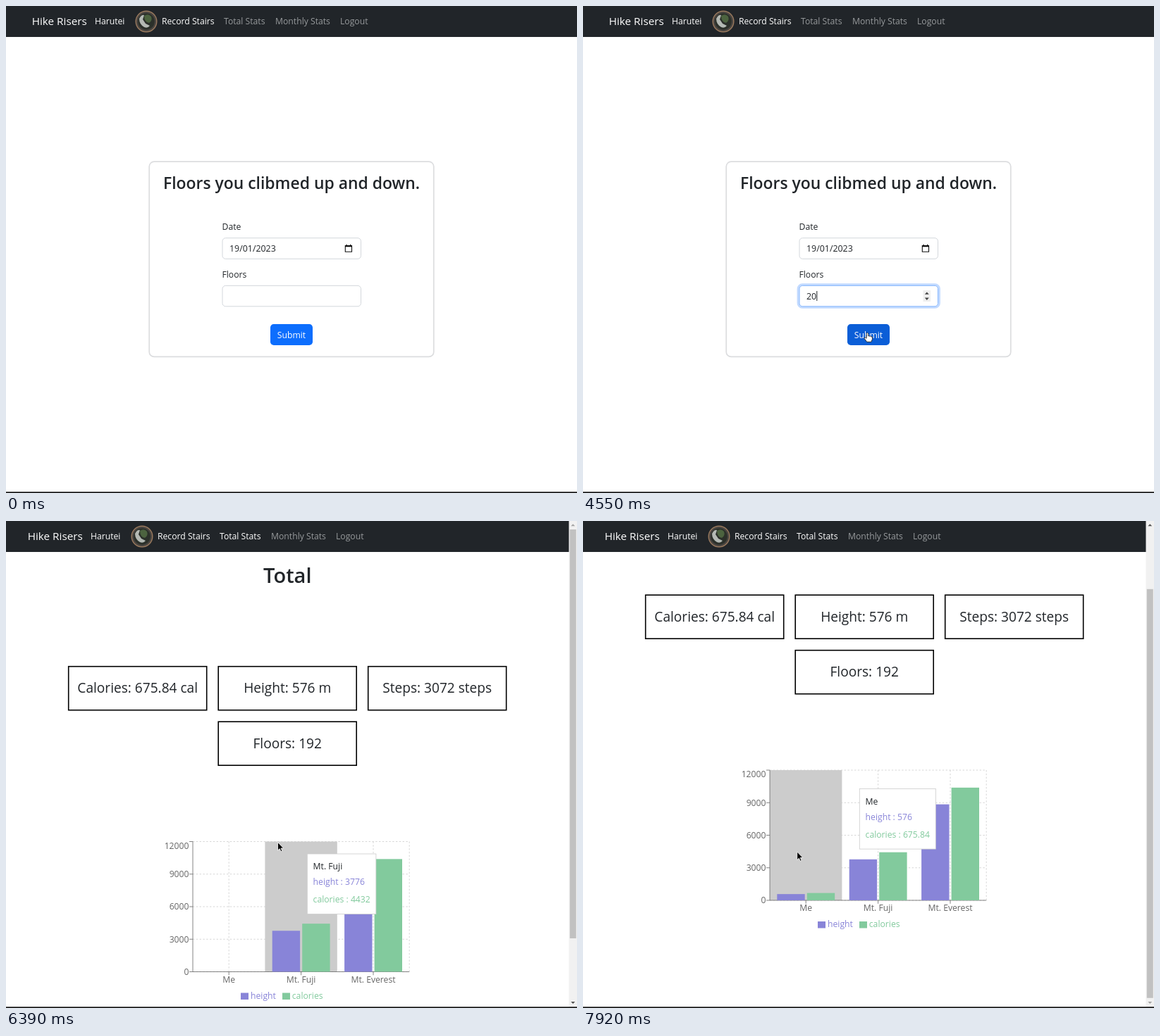
Write an HTML page that moves like this. It is 810 px wide and 692 px high and loops after 7.99 s.

```html
<!DOCTYPE html>
<html lang="en">
<head>
<meta charset="utf-8">
<title>Stair log</title>
<style>
  html, body { margin: 0; width: 100%; height: 100%; overflow: hidden; background: #fff; }
  svg { display: block; width: 810px; height: 692px; }
  text { font: 500 12.2px "Open Sans", "Noto Sans", sans-serif; fill: #212529; white-space: pre; }
  .mid { text-anchor: middle; }
  .end { text-anchor: end; }
  .brand { font-size: 15.3px; font-weight: 400; }
  .title { font-size: 22.9px; font-weight: 600; }
  .head { font-size: 29px; font-weight: 600; }
  .stat { font-size: 19.1px; font-weight: 400; }
  .value { font-size: 12.4px; }
  .on { fill: #fff; }
  .off { fill: #979a9c; }
  .axis { fill: #666; }
  .h { fill: #8884d8; }
  .c { fill: #82ca9d; }
  .field { fill: #fff; stroke: #d3d7dc; stroke-width: 1; }
  .box { fill: #fff; stroke: #000; stroke-width: 1.6; }
</style>
</head>
<body>
<svg id="stage" viewBox="0 0 810 692"></svg>
<script>
const LOOP = 7990, PAGE = 5940, LOADED = 6310;
const BASE = 640.5, TALL = 185, LEFT = 265, BAND = 102.4;
const peaks = [["Me", 576, 675.84], ["Mt. Fuji", 3776, 4432], ["Mt. Everest", 8848, 10388]];

const text = (x, y, s, cls = "", id = "") => `<text x="${x}" y="${y}" class="${cls}" id="${id}">${s}</text>`;
const rect = (x, y, w, h, rest = "") => `<rect x="${x}" y="${y}" width="${w}" height="${h}" ${rest}/>`;
const path = (d, rest = "") => `<path d="${d}" ${rest}/>`;
const group = (id, body) => `<g id="${id}">${body}</g>`;

function form() {
  return rect(203.2, 221.2, 403.6, 277.2, 'rx="7" fill="#fff" stroke="#dcdddf" stroke-width="1.7"')
    + text(405, 260, "Floors you clibmed up and down.", "mid title")
    + text(306.5, 318, "Date")
    + rect(307, 329.7, 196.5, 29.6, 'rx="4.5" class="field"')
    + text(317, 349, "19/01/2023", "value")
    + path("M481.3 340.5h9.2v8.7h-9.2z", 'fill="none" stroke="#111" stroke-width="1.1"')
    + path("M481 340h9.8v2.2h-9.8zM482.6 338.8h1.2v1.5h-1.2zM488 338.800h1.200v1.500h-1.200z", 'fill="#111"')
    + text(306.5, 386, "Floors")
    + rect(305.2, 395.8, 200.1, 32.4, 'rx="6" id="ring" fill="none" stroke="#0d6efd" stroke-opacity=".25" stroke-width="3.2"')
    + rect(307, 397.4, 196.5, 29.4, 'rx="4.5" class="field" id="floors"')
    + text(317, 416.5, "", "value", "typed")
    + rect(0, 405, 1, 14, 'id="caret" fill="#212529"')
    + group("spin", rect(482.5, 404, 10.5, 16, 'fill="#efefef"')
      + path("M484.8 409.8l3-3.4 3 3.4zM484.8 414.6l3 3.4 3-3.4z", 'fill="#444"'))
    + rect(375, 452, 60, 30, 'rx="4.8" id="button"')
    + text(405, 471.5, "Submit", "mid on");
}

function stat(x, y, id) {
  return rect(x, y, 196, 62, 'class="box"') + text(x + 98, y + 37.5, "", "mid stat", id);
}

function chart() {
  let out = "", axis = "", grid = "";
  for (let i = 0; i < 5; i++) {
    const y = BASE - i * TALL / 4;
    grid += `M${LEFT} ${y}h${3 * BAND}`;
    axis += `M${LEFT - 5} ${y}h5`;
    out += text(259.5, i == 4 ? y + 10 : y + 4.4, i * 3000, "end axis");
  }
  peaks.forEach(([name], i) => {
    const x = LEFT + (i + .5) * BAND;
    grid += `M${x} ${BASE - TALL}v${TALL}`;
    axis += `M${x} ${BASE}v4.8`;
    out += text(x, BASE + 15, name, "mid axis");
  });
  grid += `M${LEFT + 3 * BAND} ${BASE - TALL}v${TALL}`;
  axis += `M${LEFT} ${BASE - TALL}V${BASE}h${3 * BAND}`;
  out += path(grid, 'fill="none" stroke="#ccc" stroke-width=".8" stroke-dasharray="2.4"')
    + rect(0, BASE - TALL, BAND, TALL, 'id="hover" fill="#ccc"')
    + path(axis, 'fill="none" stroke="#666" stroke-width=".8"');
  peaks.forEach((p, i) => ["h", "c"].forEach((k, j) => {
    out += rect(LEFT + i * BAND + 10.3 + j * 42.5, 0, 39.4, 0, `class="${k}" id="${k + i}"`);
  }));
  return out + rect(333, 670.5, 11, 9.5, 'class="h"') + text(347, 678.5, "height", "h")
    + rect(392, 670.5, 11, 9.5, 'class="c"') + text(405.8, 678.5, "calories", "c");
}

function totals() {
  return text(399.3, 88, "Total", "mid head")
    + stat(88.7, 206.7, "cal") + stat(301.2, 206.7, "height")
    + stat(513.7, 206.7, "steps") + stat(301.2, 285.2, "count") + chart();
}

function nav() {
  return text(36.7, 27, "Hike Risers", "on brand") + text(126, 26, "Harutei", "on")
    + '<circle cx="199" cy="22" r="14.8" fill="#4a4541" stroke="#9a7a5e" stroke-width="1.4"/>'
    + '<circle cx="199" cy="22" r="11.8" fill="#2b302a"/>'
    + path("M189 18q3-6 7-5l-2 6 4 6 6 3q-3 4-8 2-7-4-7-12z", 'fill="#b4b9b4"')
    + path("M196 14q6-4 10 1 2 6-3 9-7-1-7-10z", 'fill="#4c633f"')
    + text(221, 26, "Record Stairs", "on") + text(309, 26, "Total Stats", "off", "tab")
    + text(382, 26, "Monthly Stats", "off") + text(474, 26, "Logout", "off");
}

function scrollbar() {
  return rect(798.5, 0, 11.5, 690, 'fill="#f1f1f1"')
    + rect(799.8, 12, 9, 581, 'id="thumb" fill="#c1c1c1"')
    + path("M801.4 7.2l2.9-3 2.9 3z", 'id="up"') + path("M801.4 683l2.9 3 2.9-3z", 'id="down"');
}

function pointers() {
  const hand = "M-1.2 1.2Q0-.8 1.3 1.2V5q1.2-.7 2 .3 1.2-.6 2 .5 1.6-.4 1.8 1.2V9.5L5.6 13.3H-.6L-4.2 8.4Q-4.3 6.5-2.6 7.1L-1.2 8.2Z";
  return group("arrow", path("M0 0V11.6L2.7 9.2 4.5 13.3 6.4 12.5 4.6 8.5H8.2Z",
      'fill="#000" stroke="#fff" stroke-width=".8"'))
    + group("beam", path("M-3-6.5H-.8L0-5.8.8-6.5H3M0-5.8V5.8M-3 6.5H-.8L0 5.8.8 6.5H3",
      'fill="none" stroke="#444" stroke-width="1"'))
    + group("hand", path(hand, 'fill="#fff" stroke="#222" stroke-width=".9"'));
}

document.getElementById("stage").innerHTML = rect(0, 0, 810, 692, 'fill="#fff"')
  + group("form", form()) + group("totals", totals())
  + group("tip", rect(0, 0, 97.6, 85.6, 'id="tipBox" fill="#fff" stroke="#ccc" stroke-width=".8"')
    + text(8.3, 22, "", "", "tipName") + text(8.3, 44, "", "h", "tipH") + text(8.3, 69, "", "c", "tipC"))
  + rect(0, 0, 810, 44, 'fill="#212529"') + group("nav", nav()) + group("bar", scrollbar())
  + rect(0, 690.3, 810, 1.7, 'fill="#161616"') + group("pointer", pointers());

const $ = id => document.getElementById(id);
const set = (id, attrs) => { for (const k in attrs) $(id).setAttribute(k, attrs[k]); };
const show = (id, yes) => set(id, { display: yes ? "inline" : "none" });
const say = (id, s) => { if ($(id).textContent !== s) $(id).textContent = s; };
const move = (id, x, y) => set(id, { transform: `translate(${x} ${y})` });

// Tables hold each row until the next time.
const at = (rows, t) => rows.reduce((hit, row) => t >= row[0] ? row : hit, rows[0]);

function glide(start, end, from, to, kind) {
  return [.04, .15, .38, .64, .85, .96, 1].map((p, i) => {
    const x = from[0] + (to[0] - from[0]) * p, y = from[1] + (to[1] - from[1]) * p;
    return [start + (end - start) * i / 6, x, y, kind(y)];
  });
}

const cursor = [
  [0, 0, 0, ""], [100, 140, 165, "arrow"], [180, 235, 108, "arrow"], [260, 326, 63, "arrow"],
  ...glide(790, 1200, [326, 63], [362.5, 408], y => y > 397 || y > 330 && y < 359 ? "beam" : "arrow"),
  [3670, 0, 0, ""],
  ...glide(3920, 4410, [363, 412], [403.3, 464], y => y < 427 ? "beam" : y < 452 ? "arrow" : "hand"),
  [6060, 403, 463, "arrow"], [6390, 385.5, 456.5, "arrow"], [6510, 360, 444, "arrow"],
  [6570, 325, 424, "arrow"], [6630, 298, 402, "arrow"], [6690, 280, 386, "arrow"],
  [6740, 272, 379, "arrow"], [6790, 269, 376, "arrow"], [7520, 271, 381, "arrow"],
  [7600, 277, 398, "arrow"], [7680, 286, 422, "arrow"], [7760, 295, 447, "arrow"],
  [7840, 301, 463, "arrow"], [7920, 303.7, 470, "arrow"]
];
const entry = [[0, ""], [3270, "2"], [3350, "20"]];
const caret = [[0, 0], [1680, 1], [2240, 0], [2780, 1], [3920, 0], [4550, 1], [5060, 0]];
const focus = [[0, 0], [1680, .12], [1700, 1], [5130, .75], [5200, .3], [5290, 0]];
const button = [[0, "#0d6efd"], [4280, "#0b5ed7"], [5130, "#0a58ca"], [5370, "#0b5ed7"]];
const grow = [[0, 0], [6060, .5], [6100, .8], [6150, 1]];
const growMe = [[0, 0], [6510, .35], [6570, .6], [6630, .8], [6690, .92], [6740, .98], [6790, 1]];
const tip = [
  [0, 0, 0, -1], [PAGE, 277, 460.5, 1], [6060, 380, 468.5, 1], [6100, 410, 471.5, 1], [6150, 427.3, 473, 1],
  [6510, 0, 0, -1], [7680, 427.3, 371, 0], [7760, 423, 372, 0], [7840, 411, 375, 0], [7920, 392.3, 380.5, 0]
];
const scroll = [[0, 0], [7390, 48], [7430, 89], [7520, 101.5]];

function drawForm(t) {
  const word = at(entry, t)[1], f = at(focus, t)[1];
  say("typed", word);
  set("caret", { x: 317.3 + word.length * 7 });
  show("caret", at(caret, t)[1]);
  set("ring", { opacity: f });
  set("floors", { style: `stroke:${f > .5 ? "#86b7fe" : f ? "#a9cbf8" : "#d3d7dc"}` });
  show("spin", t >= 1200 && t < 5130);
  set("button", { fill: at(button, t)[1] });
}

function drawTotals(t) {
  const ready = t >= LOADED, top = at(scroll, t)[1];
  const [, x, y, band] = at(tip, t);
  say("cal", ready ? "Calories: 675.84 cal" : "Calories: cal");
  say("height", `Height: ${ready ? 576 : 0} m`);
  say("steps", `Steps: ${ready ? 3072 : 0} steps`);
  say("count", `Floors: ${ready ? 192 : 0}`);
  peaks.forEach(([, h, c], i) => {
    const p = at(i ? grow : growMe, t)[1];
    [["h", h], ["c", c]].forEach(([k, v]) => {
      const size = v / 12000 * TALL * p;
      set(k + i, { y: BASE - size, height: size });
    });
  });
  move("totals", 0, -top);
  move("thumb", 0, top * .835);
  set("up", { fill: top ? "#505050" : "#a3a3a3" });
  set("down", { fill: top > 101 ? "#a3a3a3" : "#505050" });
  show("hover", band >= 0);
  show("tip", band >= 0);
  if (band < 0) return;
  const [name, h, c] = peaks[band];
  set("hover", { x: LEFT + band * BAND });
  set("tipBox", { width: band ? 97.6 : 108 });
  say("tipName", name);
  say("tipH", `height : ${h}`);
  say("tipC", `calories : ${c}`);
  move("tip", x, y);
}

function draw(t) {
  const second = t >= PAGE;
  show("form", !second);
  show("totals", second);
  show("bar", second);
  move("nav", second ? -6 : 0, 0);
  set("tab", { class: t >= 6060 ? "on" : "off" });
  if (second) drawTotals(t);
  else { show("tip", false); drawForm(t); }
  const [, x, y, kind] = at(cursor, t);
  for (const k of ["arrow", "beam", "hand"]) show(k, k === kind);
  move("pointer", x, y);
}

const began = performance.now();
function tick() {
  draw((performance.now() - began) % LOOP);
  requestAnimationFrame(tick);
}
tick();
</script>
</body>
</html>
```
